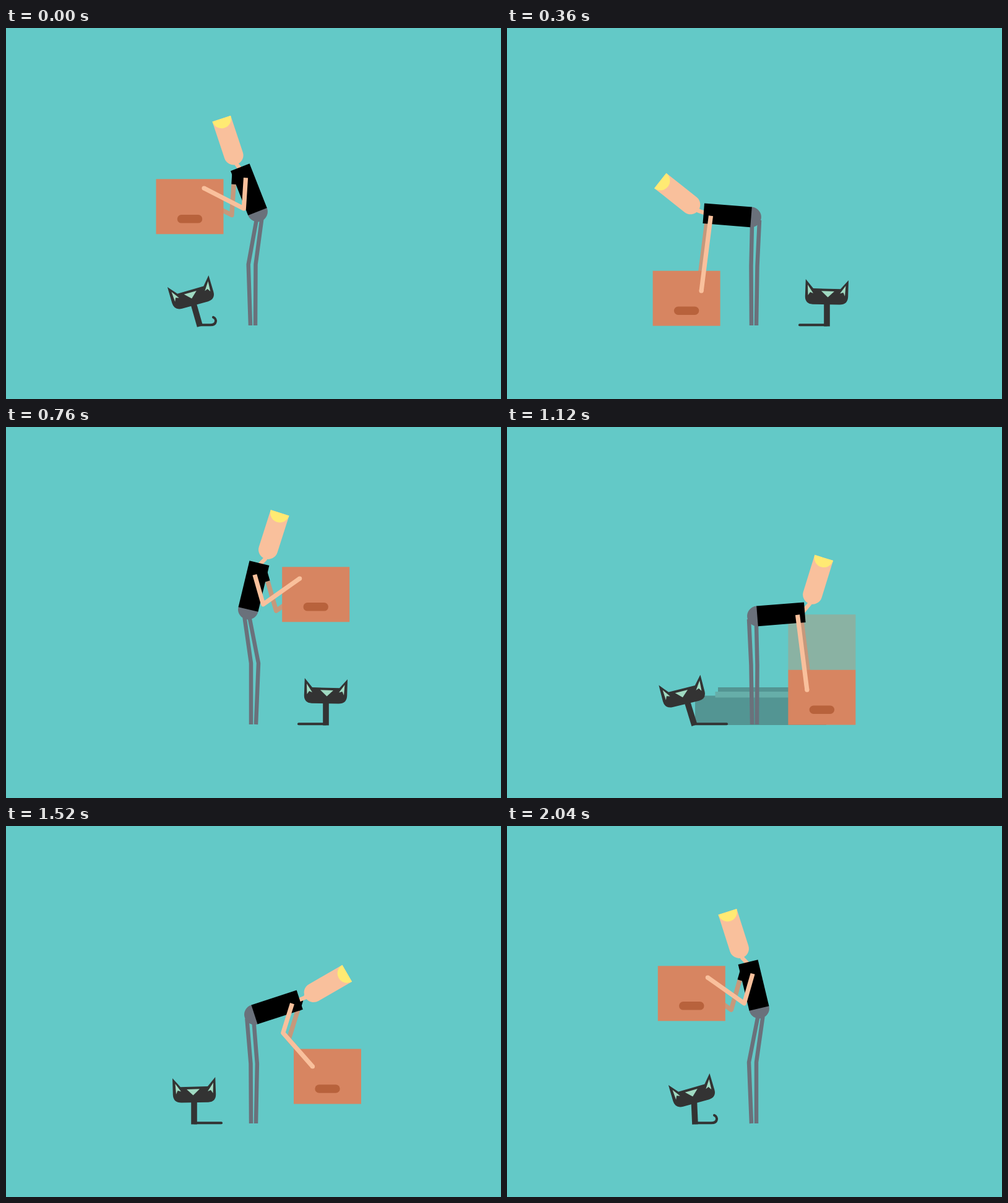
Write an HTML page that moves like this. It is 800 px wide and 600 px high and loops after 2.08 s.

```html
<!DOCTYPE html>
<html lang="en">
<head>
<meta charset="utf-8">
<title>Box mover</title>
<style>
  html, body { margin: 0; width: 100%; height: 100%; overflow: hidden; background: #63c9c7; }
  svg { display: block; width: 800px; height: 600px; }
</style>
</head>
<body>
<svg id="stage" viewBox="0 0 800 600"></svg>
<script>
const LOOP = 2080, STEP = 40;
const SKIN = '#f9c09c', SHADE = '#c6987b', GREY = '#6a717b', DARK = '#333', MINT = '#a0dac2';
const stage = document.getElementById('stage');

// Facing right: hip x, y, torso lean, head angle, neck x, y, box x, y, hand x, y, knee x
const BENT  = [5, 305.8, 85.5, 51.6, 8.8, -4.4, 109.4, 437.2, -24, -12, -5];
const LAND  = [5, 305.8, 85.5, 17.2, 7.9, -13.8, 109.4, 437.2, -24, -12, -5];
const NOD   = [5, 305.8, 85.5, 64, 9, -3, 109.4, 437.2, -24, -12, -5];
const LIFT  = [2, 305, 72, 60, 9, -4, 120, 405, -24, -16, -4];
const SWING = [-11, 302, 30, 58, 8, -5, 117, 325, -20, -22, -1];
const RISE  = [-10, 299, 20.3, 41, 7, -5.8, 109.3, 301.8, -18.8, -25.3, -1.5];
const UP    = [-8, 295, 13.5, 17.7, 9.5, -7, 101.2, 270.8, -26, -25.8, -3.5];
const DROP  = [-7, 297, 21.5, 18.4, 5.4, -4.7, 102.5, 288.8, -23, -29.8, -4];
const MIRRORED = [0, 2, 3, 4, 6, 8, 10];
const flip = (pose, side) => pose.map((v, i) => MIRRORED.includes(i) ? v * side : v);

// Cat: base x, head x, head tilt, tail reach, tail curl
const REST = [0, 0, 0, 44, 0], ARRIVE = [-1, -18.7, -12.5, 51, 0], SETTLE = [0, -5, -4, 47, 0];
const READY = [0, -2.5, -14.4, 26, 1], GO = [9.5, -2.5, -14.4, 26, 1];

const easeOut = u => 1 - (1 - u) ** 3;
const linear = u => u;

function sample(keys, t) {
  let i = 0;
  while (i < keys.length - 2 && t >= keys[i + 1][0]) i++;
  const [t0, a] = keys[i], [t1, b, ease = linear] = keys[i + 1];
  const u = ease(Math.min(1, Math.max(0, (t - t0) / (t1 - t0))));
  return a.map((v, k) => v + (b[k] - v) * u);
}

function elbow([x0, y0], [x1, y1]) {
  const A = 49.8, B = 72.3, dx = x1 - x0, dy = y1 - y0, len = Math.hypot(dx, dy) || 1;
  const d = Math.min(A + B, Math.max(B - A, len));
  const along = (A * A - B * B + d * d) / (2 * d);
  const off = Math.sqrt(Math.max(0, A * A - along * along));
  return [x0 + (dx * along - dy * off) / len, y0 + (dy * along + dx * off) / len];
}

const line = (points, color, width, extra = '') =>
  `<path d="M${points.map(p => p.join()).join('L')}" fill="none" stroke="${color}" stroke-width="${width}" stroke-linejoin="round" ${extra}/>`;
const rect = (x, y, w, h, fill, extra = '') =>
  `<rect x="${x}" y="${y}" width="${w}" height="${h}" fill="${fill}" ${extra}/>`;
const shift = ([x, y], dx, dy) => [x + dx, y + dy];

function person(signed, landing) {
  const side = signed[6] < 0 ? -1 : 1;
  const [hx, hy, lean, tilt, nx, ny, bx, by, gx, gy, knee] = flip(signed, side);
  const bend = Math.min(1, Math.max(0, (lean - 14) / 71));
  const a = lean * Math.PI / 180, sin = Math.sin(a), cos = Math.cos(a);
  const torso = (up, forward) => [hx + up * sin + forward * cos, hy - up * cos + forward * sin];

  const shoulder = torso(57 + 8 * bend, -3 + 6 * bend);
  const hand = [bx + gx, by + gy];
  const joint = elbow(shoulder, hand);
  const far = [shoulder, joint, hand].map(p => shift(p, 21 - 14.5 * bend, 10.5));
  const dx = far[1][0] - far[0][0], dy = far[1][1] - far[0][1], len = Math.hypot(dx, dy);
  const sleeve = shift(far[0], -17 * dx / len, -17 * dy / len);

  const top = torso(77, 0), chin = shift(top, nx, ny);
  const left = bx - 54.5, boxTop = by - 44.5, kneeY = 382 + 3 * bend;
  const leg = (x, y, k, foot) => line([[hx + x, hy + y], [k, kneeY], [foot, 481]], GREY, 6.5);

  return `<g transform="translate(399.5 0) scale(${side} 1)">
    ${landing ? rect(left, boxTop - 89.5, 109, 89.5, '#d7835f', 'opacity=".34"') : ''}
    ${line(far, SHADE, 7.5)}
    ${line([sleeve, far[0]], '#000', 7.5)}
    ${rect(left, boxTop, 109, 89, '#d78561')}
    ${rect(bx - 20.2, boxTop + 57.8, 40.4, 13.5, '#b8623c', 'rx="6.7"')}
    ${line([torso(73, 0), chin, shift(chin, 2, -5)], SKIN, 6.5)}
    <g transform="translate(${chin}) rotate(${tilt})">
      <path d="M-15.6-78H15.6V-15.6A15.6 15.6 0 0 1-15.6-15.6Z" fill="${SKIN}"/>
      <path d="M-15.6-78H15.6A15.6 15.6 0 0 1-15.6-78Z" fill="#ffea73"/>
    </g>
    ${leg(-6 - 7.5 * bend, 13 - 8 * bend, knee, -3.5)}
    ${leg(2 - 3.5 * bend, 13, knee + 12 - 2 * bend, 4.5)}
    <g transform="translate(${hx} ${hy}) rotate(${lean})">
      <path d="M-16.4-1H16.4V0A16.4 16.4 0 0 1-16.4 0Z" fill="${GREY}"/>
      ${rect(-16.4, -77, 32.8, 77, '#000')}
    </g>
    ${line([shoulder, joint, hand], SKIN, 7.2)}
    <circle cx="${hand[0]}" cy="${hand[1]}" r="3.6" fill="${SKIN}"/>
  </g>`;
}

function cat([base, head, tilt, reach, curl], onRight, running) {
  const smear = rect(304, 434.5, 212, 47.5, '#539593') +
    rect(341, 421, 175, 14, '#539593') + rect(336.5, 428, 179.5, 9.5, '#66aea9');
  const tail = `M${304 + base} 480.3H${304 + reach}c${11 * curl} 0 ${11 * curl} ${-10 * curl} ${5 * curl} ${-12.5 * curl}`;
  return `<g transform="${onRight ? 'matrix(-1 0 0 1 821 0)' : ''}">
    ${running ? smear : ''}
    <path d="${tail}" fill="none" stroke="${DARK}" stroke-width="4" stroke-linecap="round"/>
    ${line([[304 + head * .7, 443], [304 + base, 482.5]], DARK, 9.6)}
    <g transform="translate(${304.5 + head} ${435 - tilt * .1}) rotate(${tilt})">
      <path d="M-35.5-27L-22.5-12.7L21.5-14L33.7-29L34.7-1Q34.7 11 22.5 11.7L-21 12.5Q-34 12.5-34.7 0Z" fill="${DARK}"/>
      <path d="M-31-18L-21.5-5.5L-27-7L-29.5-1ZM30.5-20L21.5-6L26.5-8L30-3ZM-12.5-9L8.5-9.7L-2 .5Z" fill="${MINT}"/>
    </g>
  </g>`;
}

function draw(ms) {
  let t = Math.floor((ms % LOOP) / STEP + 1e-4) * STEP;
  if (t < 40) t += LOOP;
  const onRight = t < 1120;
  const start = onRight ? 40 : 1120, n = onRight ? 1080 : 1000, side = onRight ? -1 : 1;
  const tau = t - start;
  const here = p => flip(p, side), there = p => flip(p, -side);

  const pose = sample([
    [0, here(LAND)], [40, here(NOD)], [120, here(BENT)], [360, here(BENT)], [400, here(LIFT)],
    [480, there(SWING)], [520, there(RISE)], [720, there(UP), easeOut],
    [n - 80, there(UP)], [n - 40, there(DROP)], [n, there(LAND)]
  ], tau);
  const catPose = sample([
    [0, ARRIVE], [40, SETTLE], [160, REST, easeOut], [n - 320, REST],
    [n - 80, READY, easeOut], [n - 40, GO], [n, GO]
  ], tau);

  const landing = tau < STEP;
  stage.innerHTML = rect(0, 0, 800, 600, '#63c9c7') + cat(catPose, onRight, landing) + person(pose, landing);
}

const begin = performance.now();
function tick() {
  draw(performance.now() - begin);
  requestAnimationFrame(tick);
}
tick();
</script>
</body>
</html>
```
